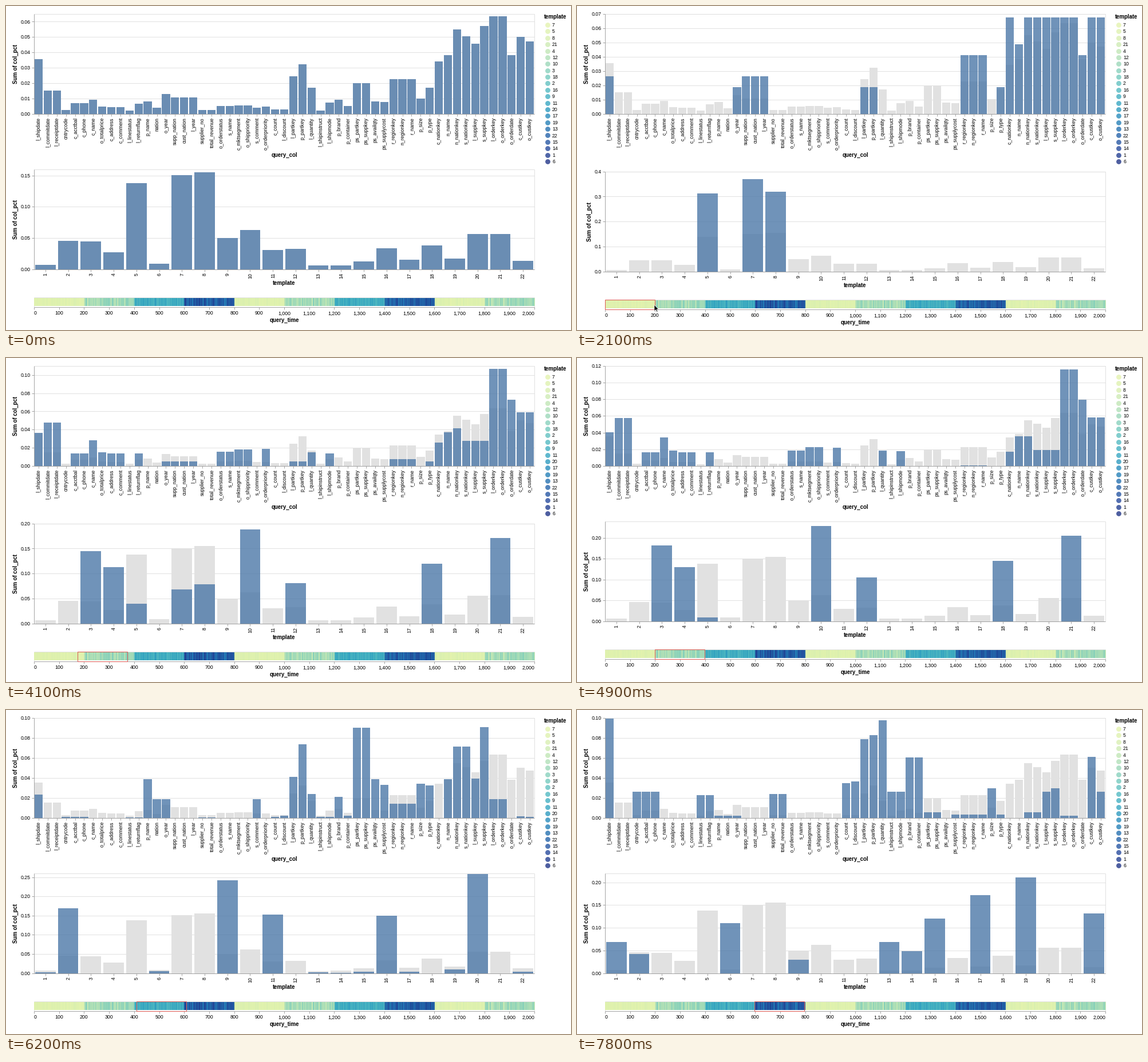
Recreate the animation shown at these times as a matplotlib script. Size 987 by 567 pixels, loop 8000 ms.

```python
import random
import numpy as np
import matplotlib.pyplot as plt
from matplotlib.animation import FuncAnimation
from matplotlib.collections import LineCollection, PolyCollection
from matplotlib.colors import LinearSegmentedColormap
from matplotlib.patches import Polygon, Rectangle
from matplotlib.transforms import Affine2D

W, H, DPI = 987, 567, 100
FRAMES, STEP_MS = 80, 100
LEFT, RIGHT, PLOT_H = 49, 923, 174.8
SMALL, BOLD = 8.74, 9.6
GRID, AXIS = "#dddddd", "#999999"
BLUE, GREY = "#4c78a8", "#e1e1e1"

COLS = """l_shipdate l_commitdate l_receiptdate cntrycode c_acctbal c_phone c_name
o_totalprice c_address c_comment l_linestatus l_returnflag p_name nation o_year
supp_nation cust_nation l_year supplier_no total_revenue o_orderstatus s_name
c_mktsegment o_shippriority s_comment o_orderpriority c_count l_discount l_partkey
p_partkey l_quantity l_shipinstruct l_shipmode p_brand p_container ps_partkey
ps_suppkey ps_availqty ps_supplycost r_regionkey n_regionkey r_name p_size p_type
c_nationkey n_name n_nationkey s_nationkey l_suppkey s_suppkey l_orderkey o_orderkey
o_orderdate c_custkey o_custkey""".split()

# columns each query template touches, templates 1 to 22
USES = """l_shipdate l_returnflag l_linestatus
p_partkey ps_partkey s_suppkey ps_suppkey p_size p_type s_nationkey n_nationkey n_regionkey r_regionkey r_name ps_supplycost
c_mktsegment c_custkey o_custkey l_orderkey o_orderkey o_orderdate l_shipdate o_shippriority
o_orderdate l_orderkey o_orderkey l_commitdate l_receiptdate o_orderpriority
c_custkey o_custkey l_orderkey o_orderkey l_suppkey s_suppkey c_nationkey s_nationkey n_nationkey n_regionkey r_regionkey r_name o_orderdate n_name
l_shipdate l_discount l_quantity
s_suppkey l_suppkey o_orderkey l_orderkey c_custkey o_custkey s_nationkey n_nationkey c_nationkey n_name l_shipdate supp_nation cust_nation l_year
p_partkey l_partkey s_suppkey l_suppkey l_orderkey o_orderkey o_custkey c_custkey c_nationkey n_nationkey n_regionkey r_regionkey r_name s_nationkey o_orderdate p_type o_year
s_suppkey l_suppkey ps_suppkey ps_partkey l_partkey p_partkey o_orderkey l_orderkey s_nationkey n_nationkey p_name nation o_year
c_custkey o_custkey l_orderkey o_orderkey o_orderdate l_returnflag c_nationkey n_nationkey c_name c_acctbal c_phone n_name c_address c_comment
ps_suppkey s_suppkey s_nationkey n_nationkey n_name ps_partkey ps_supplycost ps_availqty
o_orderkey l_orderkey l_shipmode l_commitdate l_receiptdate l_shipdate
c_custkey c_count
l_partkey p_partkey l_shipdate
l_shipdate l_suppkey s_suppkey supplier_no total_revenue
p_partkey ps_partkey p_brand p_type p_size ps_suppkey s_comment s_suppkey
l_partkey p_partkey p_brand p_container l_quantity
c_name c_custkey o_custkey o_orderkey l_orderkey o_orderdate o_totalprice l_quantity
p_partkey l_partkey p_brand p_container l_quantity p_size l_shipmode l_shipinstruct
s_suppkey ps_suppkey ps_partkey p_partkey p_name ps_availqty l_partkey l_suppkey l_shipdate s_nationkey n_nationkey n_name l_quantity
s_suppkey l_suppkey o_orderkey l_orderkey o_orderstatus l_receiptdate l_commitdate s_nationkey n_nationkey n_name s_name
c_phone c_acctbal c_custkey o_custkey cntrycode"""
USES = [line.split() for line in USES.split("\n")]
MIX = np.array([[(c in use) / len(use) for c in COLS] for use in USES])

BASE = np.array([.0065, .0455, .0443, .0275, .138, .0085, .151, .155, .0498, .0625, .0303,
                 .0322, .006, .0062, .0127, .0335, .0148, .0385, .0173, .056, .0562, .013])

# template shares for a few left edges of the brush
SHARES = {
    49: {5: .312, 7: .37, 8: .32},
    110: {3: .095, 4: .089, 5: .08, 7: .16, 8: .186, 10: .134, 12: .049, 18: .084, 21: .126},
    136: {3: .182, 4: .13, 5: .009, 10: .229, 12: .105, 18: .145, 21: .205},
    225: {2: .172, 6: .003, 9: .248, 11: .157, 16: .153, 19: .004, 20: .267},
    291: {1: .042, 2: .105, 6: .063, 9: .125, 11: .049, 13: .04, 14: .029, 15: .075,
          16: .07, 17: .1, 19: .14, 20: .08, 22: .083},
    310: {1: .069, 2: .042, 6: .11, 9: .03, 13: .069, 14: .048, 15: .12, 17: .172,
          19: .211, 22: .132},
}
# tick -> left edge of the brush, held until the next entry
BRUSH = {0: None, 21: 49, 38: 110, 39: 116, 40: 121, 41: 125, 42: 128, 43: 131, 44: 133,
         45: 134, 48: 135, 49: 136, 56: 195, 57: 225, 58: 225.5, 60: 226.4, 61: 227.2,
         62: 228, 70: 291, 71: 299, 72: 305, 73: 308, 76: 309, 78: 310}
# tick -> pointer tip, held likewise
POINTER = {0: None, 10: (139, 528), 11: (130, 520), 12: (135, 521), 14: (135, 523),
           23: None, 25: (5, 522), 28: (12, 521), 29: (35, 520), 30: (65, 520),
           31: (90, 521), 32: (104, 521), 33: (96, 522), 39: None}

LEGEND = [7, 5, 8, 21, 4, 12, 10, 3, 18, 2, 16, 9, 11, 20, 17, 19, 13, 22, 15, 14, 1, 6]
CMAP = LinearSegmentedColormap.from_list("ygb", [
    "#e4f3ad", "#d8efb0", "#bde5b5", "#94d5b9", "#69c5be", "#45b4c2",
    "#2c9ec0", "#2182b8", "#2163aa", "#23479c", "#1c3185"])
COLOR = {t: CMAP(i / 21) for i, t in enumerate(LEGEND)}
PHASES = [(5, 7, 8), (3, 4, 10, 12, 18, 21), (2, 9, 11, 16, 20), (1, 6, 13, 14, 15, 17, 19, 22)]


def held(table, i):
    return table[max(k for k in table if k <= i)]


def shares_at(x):
    if x is None:
        return BASE
    return np.array([np.interp(x, list(SHARES), [s.get(t, 0) for s in SHARES.values()])
                     for t in range(1, 23)])


def pointer_at(i):
    if 1 <= i <= 9:
        p = 1 - (1 - (i - 1) / 8) ** 1.6
        return 389 - 254 * p, 556 - 29 * p
    return held(POINTER, i)


def tick_step(top, count):
    raw = top / count
    power = 10.0 ** np.floor(np.log10(raw))
    err = raw / power
    return power * (10 if err >= 50 ** .5 else 5 if err >= 10 ** .5 else 2 if err >= 2 ** .5 else 1)


plt.rcParams["font.family"] = "Liberation Sans"
# the tiny surplus keeps rounding from losing a pixel
fig = plt.figure(figsize=((W + 1e-6) / DPI, (H + 1e-6) / DPI), dpi=DPI, facecolor="white")
ax = fig.add_axes([0, 0, 1, 1])
ax.axis("off")
ax.set_autoscale_on(False)
ax.set_xlim(0, W)
ax.set_ylim(H, 0)

shift = Affine2D()
fixed, moving = ax.transData, ax.transData + shift


def text(x, y, s, tr, size=SMALL, ha="center", bold=False):
    return ax.text(x, y + .35 * size, s, transform=tr, fontsize=size * 72 / DPI, ha=ha,
                   va="baseline", color="black", weight="bold" if bold else "normal")


def vtext(x, y, s, tr, size=SMALL, ha="right", bold=False):
    return ax.text(x + .33 * size, y, s, transform=tr, fontsize=size * 72 / DPI, ha=ha,
                   va="baseline", rotation=90, rotation_mode="anchor", color="black",
                   weight="bold" if bold else "normal")


def lines(segs, color, tr, z):
    lc = LineCollection(segs, colors=color, linewidths=.874 * 72 / DPI, transform=tr, zorder=z)
    ax.add_collection(lc, autolim=False)
    return lc


def frame_box(top, bottom, tr, z=.5):
    lines([[(LEFT, top), (RIGHT, top)], [(RIGHT, top), (RIGHT, bottom)]], GRID, tr, z)


class BarChart:
    def __init__(self, top, names, title, title_y, tr):
        self.top, self.floor, self.n = top, top + PLOT_H, len(names)
        floor = self.floor
        self.pitch = (RIGHT - LEFT) / self.n
        frame_box(top, floor, tr)
        self.grid = lines([], GRID, tr, 1)
        self.grey = self.layer(GREY, 1, tr, 2)
        self.blue = self.layer(BLUE, .8, tr, 3)
        self.ticks = lines([], AXIS, tr, 4)
        centers = LEFT + self.pitch * (np.arange(self.n) + .5)
        lines([[(LEFT, floor), (RIGHT, floor)], [(LEFT, top), (LEFT, floor)]]
              + [[(x, floor), (x, floor + 4.4)] for x in centers], AXIS, tr, 4)
        for x, name in zip(centers, names):
            vtext(x, floor + 6.3, name, tr)
        self.labels = [text(43, 0, "", tr, ha="right") for _ in range(10)]
        text((LEFT + RIGHT) / 2, title_y, title, tr, BOLD, bold=True)
        self.name = vtext(17, (top + floor) / 2, "Sum of col_pct", tr, BOLD, "center", True)

    def layer(self, color, alpha, tr, z):
        pc = PolyCollection([], facecolors=color, edgecolors="none", alpha=alpha,
                            transform=tr, zorder=z)
        ax.add_collection(pc, autolim=False)
        return pc

    def rects(self, values, top):
        out = []
        for k, v in enumerate(values):
            if v > 1e-6:
                x0 = LEFT + (k + .05) * self.pitch
                x1, y = x0 + .9 * self.pitch, self.floor - v / top * PLOT_H
                out.append([(x0, self.floor), (x0, y), (x1, y), (x1, self.floor)])
        return out

    def show(self, base, values):
        """Redraw; True when the uppermost tick sits on the top edge."""
        peak = max(base.max(), values.max())
        unit = tick_step(peak, 10)
        top = np.ceil(peak / unit - 1e-6) * unit
        step = tick_step(top, 5)
        ticks = np.arange(int(top / step + 1e-6) + 1) * step
        ys = self.floor - ticks / top * PLOT_H
        digits = 1 if step > .09 else 2
        self.grey.set_verts(self.rects(base, top))
        self.blue.set_verts(self.rects(values, top))
        self.grid.set_segments([[(LEFT, y), (RIGHT, y)] for y in ys])
        self.ticks.set_segments([[(LEFT - 4.4, y), (LEFT, y)] for y in ys])
        for k, label in enumerate(self.labels):
            label.set_visible(k < len(ys))
            if k < len(ys):
                label.set_y(ys[k] + .35 * SMALL)
                label.set_text(f"{ticks[k]:.{digits}f}")
        self.name.set_x((17 if digits == 2 else 22) + .33 * BOLD)
        return abs(ticks[-1] - top) < 1e-6


columns = BarChart(14, COLS, "query_col", 261, fixed)
templates = BarChart(285.8, [str(t) for t in range(1, 23)], "template", 484.5, moving)

# query timeline
S_TOP, S_BOT = 509.6, 527
rng = random.Random(4)
strip = [[COLOR[rng.choice(PHASES[q // 200 % 4])] for q in range(2000)]]
im = ax.imshow(strip, extent=(LEFT, RIGHT, 524.8, 511.8), aspect="auto", zorder=2)
im.set_transform(moving)
ax.set_xlim(0, W)
ax.set_ylim(H, 0)
frame_box(S_TOP, S_BOT, moving)
lines([[(LEFT, S_TOP), (LEFT, S_BOT)]], GRID, moving, .5)
marks = [(q, LEFT + (RIGHT - LEFT) * q / 2000) for q in range(0, 2001, 100)]
lines([[(LEFT, S_BOT), (RIGHT, S_BOT)]]
      + [[(x, S_BOT), (x, S_BOT + 4.4)] for _, x in marks], AXIS, moving, 4)
for q, x in marks:
    text(x, 537.3, f"{q:,}", moving, ha={0: "left", 2000: "right"}.get(q, "center"))
text((LEFT + RIGHT) / 2, 550, "query_time", moving, BOLD, bold=True)

# legend
text(940, 18.5, "template", fixed, BOLD, "left", True)
for k, t in enumerate(LEGEND):
    y = 33 + 11.38 * k
    ax.scatter([945.5], [y], s=(8.8 * 72 / DPI) ** 2, color=[COLOR[t]], alpha=.78, linewidths=0)
    text(954, y, str(t), fixed, ha="left")

brush = Rectangle((LEFT, S_TOP), 86.5, S_BOT - S_TOP, fill=False, edgecolor="#dd5f58",
                  linewidth=.75, transform=moving, zorder=6)
ax.add_patch(brush)
ARROW = np.array([(0, 0), (0, 11), (2.6, 8.6), (4.4, 12.4), (6, 11.7), (4.3, 7.9), (7.6, 7.9)])
pointer = Polygon(ARROW, facecolor="black", edgecolor="white", linewidth=.5, zorder=8)
ax.add_patch(pointer)


def update(i):
    x = held(BRUSH, i)
    shares = shares_at(x)
    columns.show(BASE @ MIX, shares @ MIX)
    raised = templates.show(BASE, shares)
    shift.clear().translate(0, -4 if raised else 0)
    brush.set_visible(x is not None)
    brush.set_x(x or LEFT)
    tip = pointer_at(i)
    pointer.set_visible(tip is not None)
    if tip:
        pointer.set_xy(ARROW + tip)
    return []


anim = FuncAnimation(fig, update, frames=FRAMES, interval=STEP_MS, repeat=True,
                     repeat_delay=0, blit=False)
plt.show()
```
